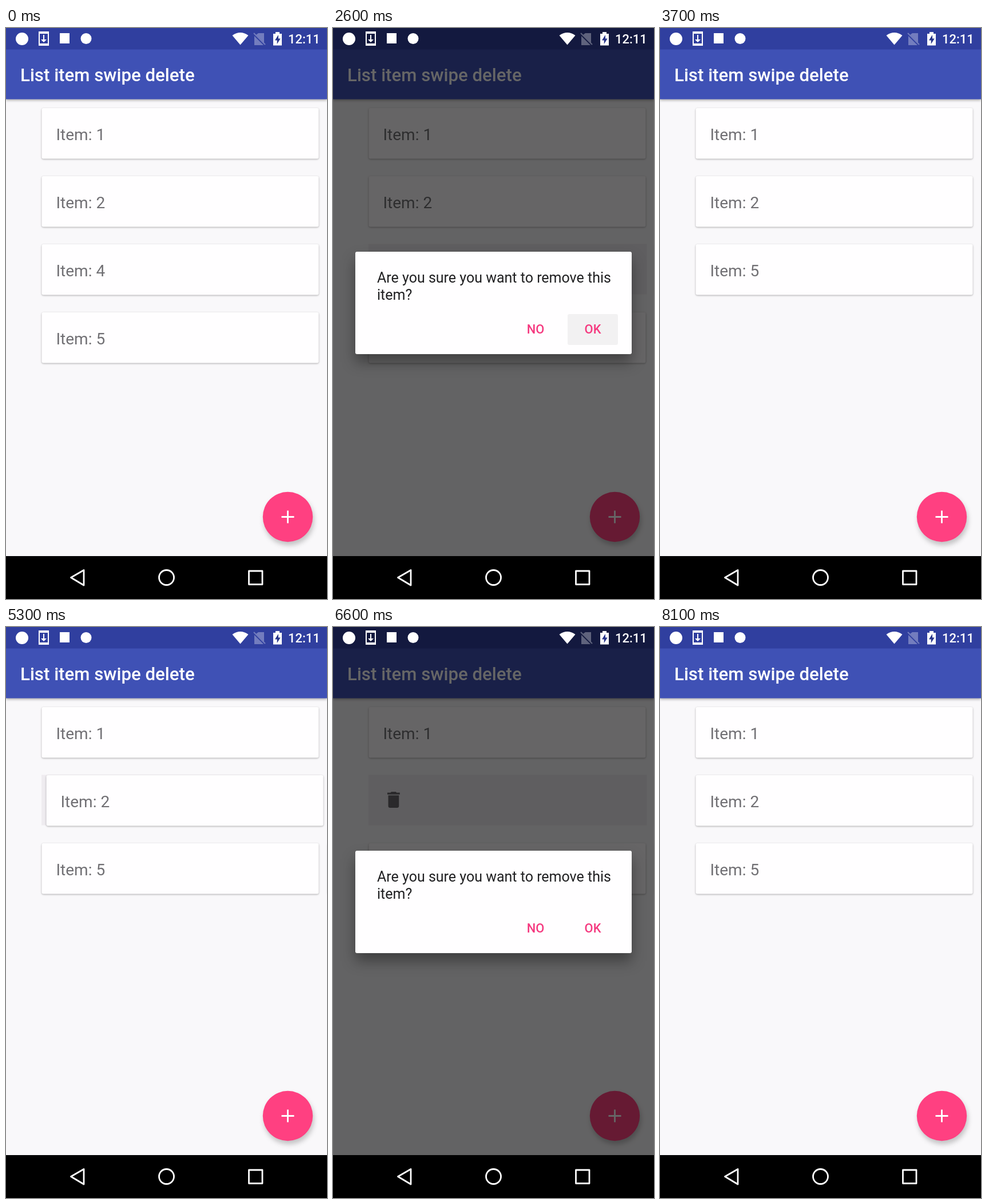
Write an HTML page that moves like this. It is 561 px wide and 998 px high and loops after 9.2 s.

```html
<!DOCTYPE html>
<html lang="en">
<head>
<meta charset="utf-8">
<title>List item swipe delete</title>
<style>
  html, body { margin: 0; width: 100%; height: 100%; overflow: hidden; background: #000; }
  svg { display: block; width: 561px; height: 998px; font-family: Roboto, sans-serif; }
  .medium { font-weight: 500; }
  .card rect { fill: #fffeff; filter: drop-shadow(0 1px 1.5px rgba(0, 0, 0, .32)); }
  .card text { font-size: 28px; fill: #717074; }
  .under { fill: #efecf0; }
  .bin { fill: #69686b; }
  .bar { filter: drop-shadow(0 2px 2px rgba(0, 0, 0, .3)); }
  .fab { filter: drop-shadow(2px 6px 4px rgba(0, 0, 0, .22)); }
  .sheet { fill: #fffeff; filter: drop-shadow(0 14px 12px rgba(0, 0, 0, .36)); }
  .ask { font-size: 25px; fill: #202022; }
  .button { font-size: 21.8px; fill: #f53a80; text-anchor: middle; }
</style>
</head>
<body>
<svg viewBox="0 0 561 998">
  <rect width="561" height="923" fill="#f9f8fa"/>
  <g id="rows"></g>

  <rect class="bar" width="561" height="124.5" fill="#3f51b5"/>
  <rect width="561" height="37.5" fill="#303f9f"/>
  <text class="medium" x="25" y="93" font-size="31.2" fill="#fff">List item swipe delete</text>

  <circle class="fab" cx="492.5" cy="854.5" r="43.7" fill="#ff4081"/>
  <path d="M481.5 854.5h22M492.5 843.5v22" stroke="#fff" stroke-width="2.8"/>

  <rect id="dim" width="561" height="923"/>

  <g id="status" fill="#fff">
    <circle cx="28" cy="19" r="11"/>
    <path d="M58 7h16v23H58z" fill="none" stroke="#fff" stroke-width="2"/>
    <path d="M57 6h18v4H57zM57 27h18v4H57zM65 12h2v8h4l-5 5-5-5h4z"/>
    <rect x="94" y="9" width="17" height="18"/>
    <circle cx="140" cy="18.5" r="9.5"/>
    <path d="M395.500 13Q409.500 3 423.500 13L409.500 29.500z"/>
    <g opacity=".32">
      <path d="M441 9h10v17L437 12zM434 14l16 16H434z"/>
      <path d="M433 9l20 20" stroke="#fff" stroke-width="2"/>
    </g>
    <path d="M471 7h7v3h4v20.500h-15V10h4z"/>
    <path d="M476 12l-6 9.500h3.700v6.500l6-9.500h-3.700z" fill="#28358a"/>
    <text class="medium" x="493" y="27" font-size="22">12:11</text>
  </g>

  <g id="dialog">
    <rect class="sheet" x="39" y="391" width="483" height="179" rx="3"/>
    <rect id="ripple" y="500" width="88" height="54" rx="3"/>
    <text class="ask" x="77" y="445">Are you sure you want to remove this</text>
    <text class="ask" x="77" y="475">item?</text>
    <text class="button medium" x="354" y="534">NO</text>
    <text class="button medium" x="454" y="534">OK</text>
  </g>

  <rect y="923" width="561" height="75"/>
  <g fill="none" stroke="#fff" stroke-width="2.8" stroke-linejoin="round">
    <path d="M113.500 960.500L136 947.500V974z"/>
    <circle cx="280.500" cy="960.500" r="13"/>
    <path d="M424.500 949h23.500v23.500h-23.500z"/>
  </g>
</svg>
<script>
  const LOOP = 9200, STEP = 100, TOP = 140, PITCH = 119;
  const $ = id => document.getElementById(id);
  const BIN = 'M6 19c0 1.1.9 2 2 2h8c1.1 0 2-.9 2-2V7H6v12zM19 4h-3.5l-1-1h-5l-1 1H5v2h14V4z';

  const SWIPE = [8, 22, 42, 66, 96, 140, 200, 262, 338, 500];
  const RETURN = [450, 190, 0];
  const DIM_IN = [.2, .44, .6], DIM_OUT = [.45, .15, 0];
  const SHEET_IN = [.65, .9, 1], SHEET_OUT = [.4, .06, 0];
  const PRESS = [.05, .09, .12, .08, 0];

  // Each dialog: time shown, time pressed, time dismissed, left edge of pressed button
  const DIALOGS = [
    { show: 1700, press: 2600, hide: 3300, x: 410 },
    { show: 6400, press: 7400, hide: 7800, x: 310 }
  ];

  // Value of a stepped track; the last value holds
  function track(t, start, values, before = 0) {
    const i = Math.floor((t - start) / STEP);
    return i < 0 ? before : values[Math.min(i, values.length - 1)];
  }

  function makeRow(label) {
    const g = document.createElementNS('http://www.w3.org/2000/svg', 'g');
    g.innerHTML = `
      <g class="back">
        <rect class="under" x="62" y="-.5" width="486.500" height="88"/>
        <path class="bin" transform="translate(87.200 24.300) scale(1.558)" d="${BIN}"/>
      </g>
      <g class="card">
        <rect x="62.500" width="484" height="88.500" rx="3"/>
        <text x="87.500" y="55.500">Item: ${label}</text>
      </g>`;
    $('rows').append(g);
    return { g, back: g.querySelector('.back'), card: g.querySelector('.card') };
  }

  const rows = [1, 2, 4, 5].map(makeRow);

  function place(row, y, x = 0, alpha = 1, backAlpha = 1) {
    row.g.setAttribute('transform', `translate(0 ${y})`);
    row.card.setAttribute('transform', `translate(${x} 0)`);
    row.card.setAttribute('opacity', alpha);
    row.back.setAttribute('opacity', x > 0 ? backAlpha : 0);
  }

  function draw(now) {
    const t = Math.floor(now % LOOP / STEP) * STEP;
    const slot = i => TOP + PITCH * i;

    const back = t >= 7900;
    const x2 = back ? track(t, 7900, RETURN) : track(t, 5300, SWIPE);
    place(rows[0], slot(0));
    place(rows[1], slot(1), x2, track(t, 7900, [.1, .6, 1], 1), track(t, 7900, [.7, .2, 0], 1));
    place(rows[2], slot(2), track(t, 200, SWIPE), 1, track(t, 3400, [.4, 0], 1));
    place(rows[3], slot(3) - track(t, 3500, [48, 104, PITCH]));

    const d = DIALOGS[t < 5000 ? 0 : 1];
    const leaving = t >= d.hide;
    $('dim').setAttribute('opacity', leaving ? track(t, d.hide, DIM_OUT) : track(t, d.show, DIM_IN));
    $('dialog').setAttribute('opacity', leaving ? track(t, d.hide, SHEET_OUT) : track(t, d.show, SHEET_IN));
    $('ripple').setAttribute('x', d.x);
    $('ripple').setAttribute('opacity', track(t, d.press, PRESS));
  }

  const begin = performance.now();
  function tick() {
    draw(performance.now() - begin);
    requestAnimationFrame(tick);
  }
  tick();
</script>
</body>
</html>
```
